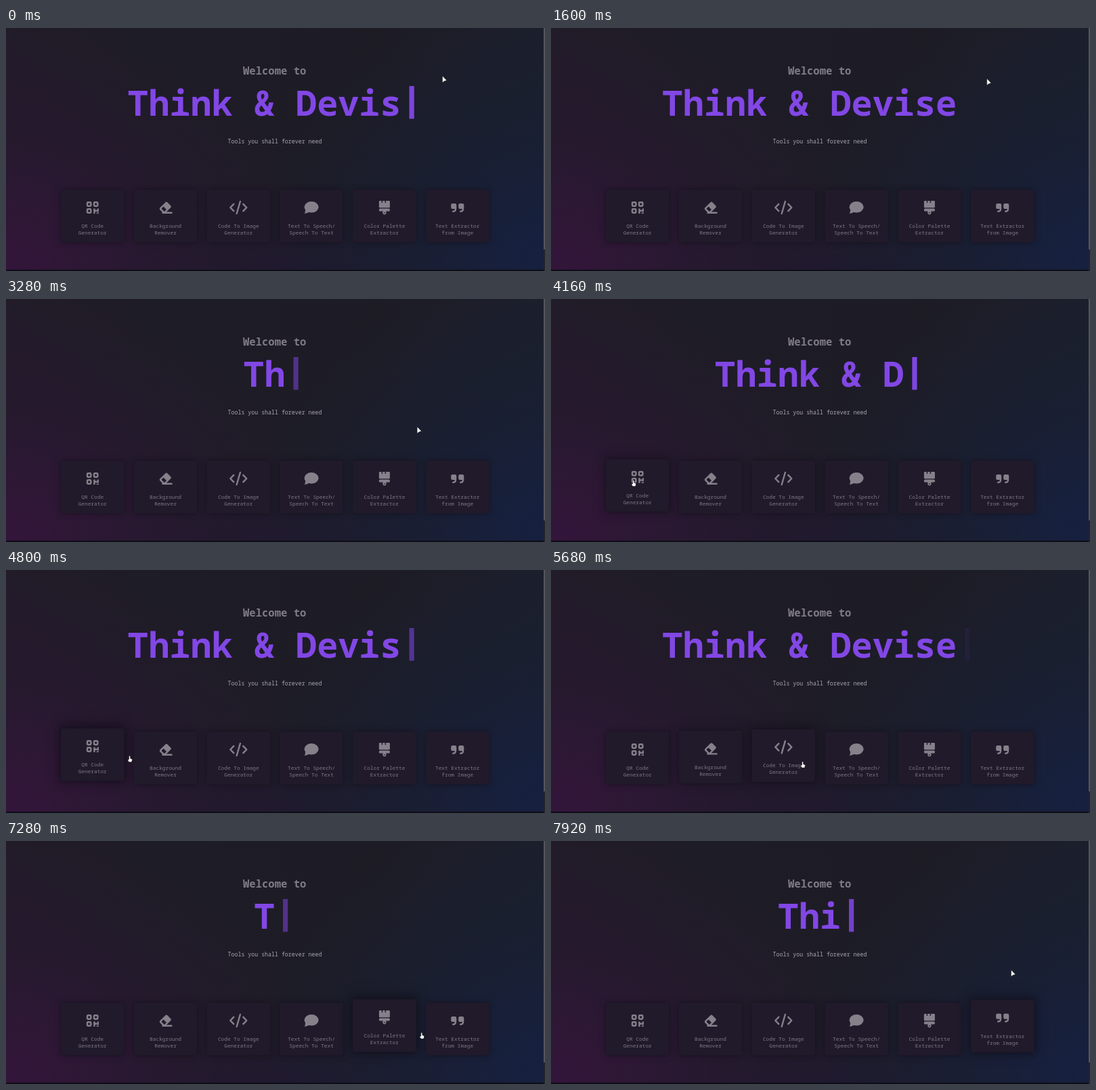
Animation of 796x360 px, one loop 8000 ms. Source, as an HTML page:

```html
<!DOCTYPE html>
<html lang="en">
<head>
<meta charset="utf-8">
<title>Tools</title>
<style>
  html, body { margin: 0; width: 100%; height: 100%; overflow: hidden; background: #1e1c26; }
  #stage {
    position: relative; width: 796px; height: 360px; overflow: hidden;
    background:
      radial-gradient(ellipse 470px 360px at 0 100%, #34153b, #2a183380 55%, #1e1c2600),
      radial-gradient(ellipse 440px 380px at 100% 96%, #162040, #18203688 55%, #1e1c2600),
      radial-gradient(ellipse 300px 70px at 52% 100%, #20143580, #20143500),
      linear-gradient(90deg, #221b29, #1e1c26 25%, #1d1c25 70%, #1c1f2b);
  }
  svg { display: block; position: absolute; inset: 0; }
  text { font-family: "Noto Sans Mono", "DejaVu Sans Mono", monospace; white-space: pre; }
  .mid { text-anchor: middle; }
  .accent { fill: #8247e5; }
  .label { font-size: 7.8px; fill: #7d7985; }
  .card { fill: #201a2a; filter: drop-shadow(0 0 4px #0d0a1399); }
  .glow { fill: #100d18; filter: blur(9px); }
  .icon { fill: #85818b; stroke: #85818b; stroke-width: 0; stroke-linecap: round; stroke-linejoin: round; }
  .line { fill: none; stroke-width: 2.4; }
  .hole { fill: #201a2a; }
</style>
</head>
<body>
<div id="stage">
<svg width="796" height="360" viewBox="0 0 796 360">
  <rect y="358" width="796" height="2" fill="#0e0d17"/>
  <rect x="794" width="2" height="360" fill="#23232b"/>
  <rect x="794" width="2" height="328" fill="#56555d"/>
  <text class="mid" x="396.7" y="69" font-size="15.55" font-weight="600" fill="#7f7b85">Welcome to</text>
  <text class="accent" id="title" y="129.5" font-size="51.83" font-weight="600"></text>
  <rect class="accent" id="caret" y="86" width="7.2" height="48.5"/>
  <text class="mid" x="397" y="171" font-size="8.28" fill="#a9a6ad">Tools you shall forever need</text>
  <g id="cards"></g>
  <g id="pointer" fill="#fff" stroke="#111" stroke-width=".5">
    <path id="arrow" d="M.5 0V10L2.8 8L6.8 6.6Z"/>
    <path id="hand" d="M0 0H2V3.5L5 5L4 9H0L-2 6L0 5Z" stroke-linejoin="round"/>
  </g>
</svg>
</div>
<script>
const TITLE = 'Think & Devise';
const PITCH = 31.1, CENTER = 397;
const CARD_STEP = 107.8, FIRST_CARD = 127.7;
const LOOP = 8000;

const box = (x, y, w, h, r = 0, cls = '') =>
  `<rect class="${cls}" x="${x}" y="${y}" width="${w}" height="${h}" rx="${r}"/>`;
const square = (x, y) => box(x - 2.7, y - 2.7, 5.4, 5.4, 1.2, 'line');
const line = d => `<path class="line" d="${d}"/>`;
const quote = x => box(x - 4, -6, 8, 8, 2) + line(`M${x + 2.8} -2V2Q${x + 2.8} 5.7 ${x - 1} 5.7`);

const cards = [
  { lines: ['QR Code', 'Generator'],
    icon: square(-5, -5) + square(5, -5) + square(-5, 5) +
      box(1.5, 1.5, 2.4, 7.5) + box(3, 3.5, 4, 2.5) + box(7, 1.5, 2.3, 5) + box(6, 7.5, 3.3, 1.5) },
  { lines: ['Background', 'Remover'],
    icon: `<g transform="rotate(-45)">${box(-8, -5.5, 15.5, 11, 2) + box(-5.5, -3.1, 4.5, 6.2, 0, 'hole')}</g>` +
      line('M-4 7.8H9') },
  { lines: ['Code To Image', 'Generator'],
    icon: line('M-7-5.2L-12 0L-7 5.2M7-5.2L12 0L7 5.2M2.6-9L-2.6 9') },
  { lines: ['Text To Speech/', 'Speech To Text'],
    icon: '<ellipse cy="-.7" rx="10.5" ry="8.3"/><path d="M-9 3Q-9 7-10.4 9Q-6 9-3 6Z"/>' },
  { lines: ['Color Palette', 'Extractor'],
    icon: box(-8, -10, 16, 10.2, 1) + box(-8, 1.6, 16, 3.8, 1.5) + box(-2.6, 4, 5.2, 6.5, 2.4) +
      box(-4.2, -10, 1.4, 3, 0, 'hole') + box(.8, -10, 1.4, 3, 0, 'hole') +
      '<circle class="hole" cy="7.8" r=".9"/>' },
  { lines: ['Text Extractor', 'from Image'],
    icon: quote(-5.5) + quote(5.5) }
];

// The pointer roams over [time, x, y], then visits the cards in turn and rests at EXIT.
const ROAM = [
  [0, 644, 71], [1600, 643, 75], [2080, 744, 19], [2320, 488, 149],
  [3300, 609, 190], [3760, 572, 203], [4105, 74, 268]
];
const VISITS = [4105, 4820, 5595, 6070, 6760, 7330, 7895];
const EXIT = [679, 191];

const $ = id => document.getElementById(id);
const clamp01 = v => Math.min(1, Math.max(0, v));
const mix = (a, b, p) => a + (b - a) * p;

$('cards').innerHTML = cards.map(({ lines, icon }, i) => `
  <g transform="translate(${FIRST_CARD + CARD_STEP * i} 0)"><g class="lift">
    ${box(-50, 232, 100, 88, 6, 'glow')}
    ${box(-46.8, 239.5, 93.6, 78, 3.5, 'card')}
    <g class="icon" transform="translate(0 266)">${icon}</g>
    <text class="label mid" y="296">${lines[0]}</text>
    <text class="label mid" y="306">${lines[1]}</text>
  </g></g>`).join('');
const lifts = [...document.querySelectorAll('.lift')];
const glows = [...document.querySelectorAll('.glow')];

// CSS "ease": cubic-bezier(.25, .1, .25, 1)
function ease(p) {
  if (p <= 0 || p >= 1) return clamp01(p);
  const bezier = (a, b, s) => 3 * a * s * (1 - s) ** 2 + 3 * b * s * s * (1 - s) + s ** 3;
  let low = 0, high = 1;
  for (let i = 0; i < 20; i++) {
    const s = (low + high) / 2;
    if (bezier(.25, .25, s) < p) low = s; else high = s;
  }
  return bezier(.1, 1, low);
}

function typedCount(t) {
  const full = TITLE.length;
  const typing = start => Math.min(full, Math.floor((t - start) / 140));
  const deleting = start => Math.max(0, full - Math.floor((t - start) / 64));
  if (t < 1740) return typing(-1820);
  if (t < 2890) return deleting(1740);
  if (t < 6410) return typing(2890);
  if (t < 7480) return deleting(6410);
  return typing(7480);
}

function caretOpacity(t) {
  const phase = ((t + 360) % 1000) / 500;
  return phase < 1 ? ease(phase) : 1 - ease(phase - 1);
}

function pointerAt(t, visited) {
  if (t >= VISITS.at(-1)) return EXIT;
  if (visited >= 0) {
    const p = (t - VISITS[visited]) / (VISITS[visited + 1] - VISITS[visited]);
    const dash = 1 - (1 - p) ** 7;
    return [FIRST_CARD + CARD_STEP * (visited + dash - .5), mix(268, 284, clamp01((t - VISITS[0]) / 1500))];
  }
  const i = ROAM.findIndex(point => point[0] > t);
  const [t0, x0, y0] = ROAM[i - 1], [t1, x1, y1] = ROAM[i];
  const p = (t - t0) / (t1 - t0);
  return [mix(x0, x1, p), mix(y0, y1, p)];
}

function draw(t) {
  const count = typedCount(t);
  const left = CENTER - (count + 1) * PITCH / 2;
  $('title').textContent = TITLE.slice(0, count);
  $('title').setAttribute('x', left);
  $('caret').setAttribute('x', left + (count + .5) * PITCH - 3.6);
  $('caret').setAttribute('opacity', caretOpacity(t));

  cards.forEach((_, i) => {
    const lift = ease((t - VISITS[i]) / 200) - ease((t - VISITS[i + 1]) / 200);
    lifts[i].setAttribute('transform', `translate(0 ${-5 * lift})`);
    glows[i].setAttribute('opacity', .45 * lift);
  });

  const visited = cards.findIndex((_, i) => t >= VISITS[i] && t < VISITS[i + 1]);
  const [x, y] = pointerAt(t, visited);
  $('pointer').setAttribute('transform', `translate(${x} ${y})`);
  $('arrow').setAttribute('visibility', visited < 0 ? 'visible' : 'hidden');
  $('hand').setAttribute('visibility', visited < 0 ? 'hidden' : 'visible');
}

const start = performance.now();
function tick() {
  draw((performance.now() - start) % LOOP);
  requestAnimationFrame(tick);
}
tick();
</script>
</body>
</html>
```
